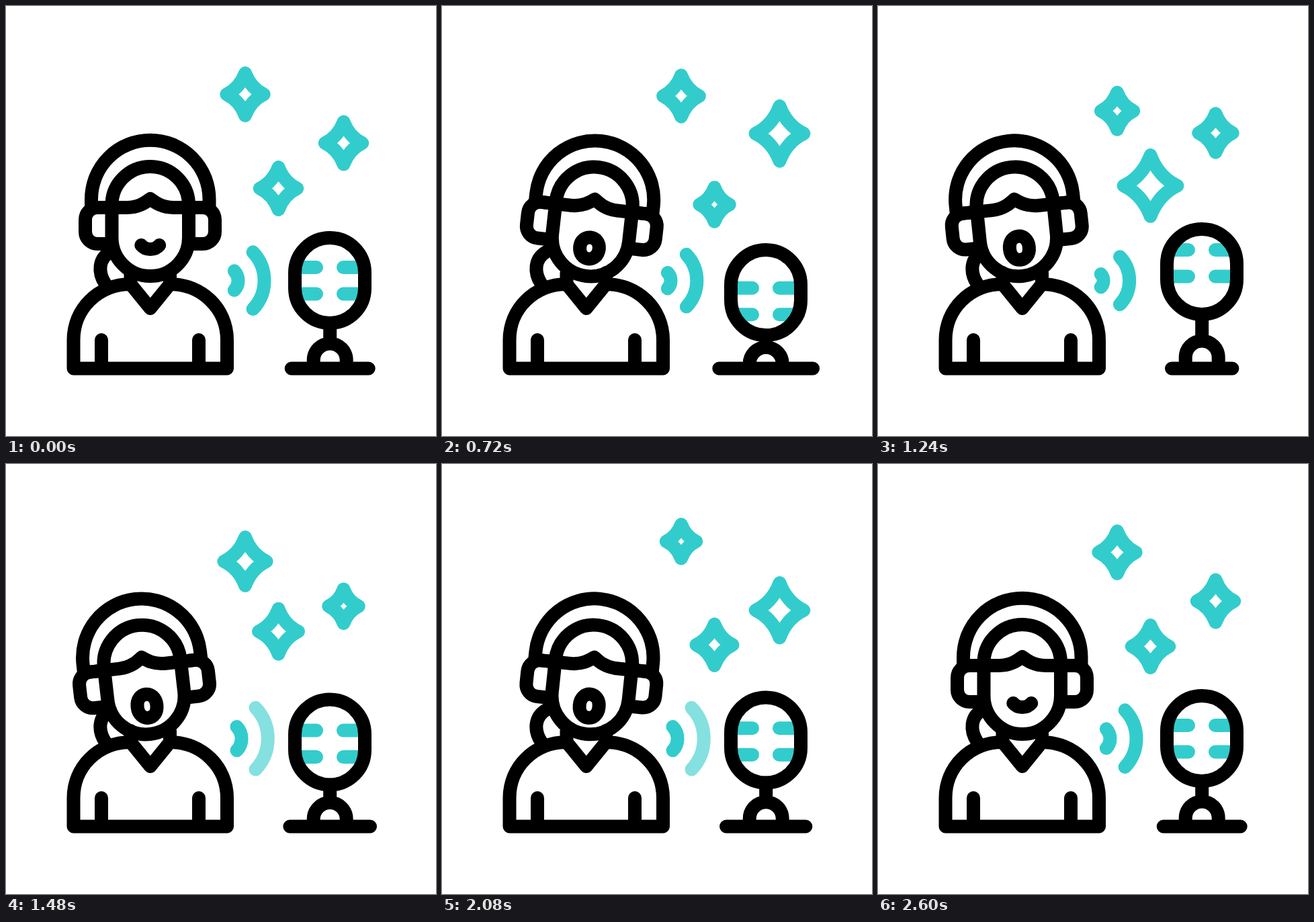
An HTML page for the animation above (3 s loop, 640x640 px).

```html
<!DOCTYPE html>
<html lang="en">
<head>
<meta charset="utf-8">
<title>Podcast recording</title>
<style>
  html, body { margin: 0; width: 100%; height: 100%; overflow: hidden; background: #fff; }
  svg { display: block; width: 100%; height: 100%; }
  path, rect { fill: none; stroke: #000; stroke-width: 20; stroke-linecap: round; stroke-linejoin: round; }
  .teal path { stroke: #33cccc; }
</style>
</head>
<body>
<svg viewBox="0 0 640 640">
  <g class="teal">
    <path id="star1"/><path id="star2"/><path id="star3"/>
    <path id="near"/><path id="far"/>
    <path id="bars" d="M434 389H462M502 389H530M434 428.5H462M502 428.5H530"/>
  </g>

  <path d="M155 366C138 376 136 396 148 414"/>
  <g id="head">
    <path d="M127 300V287.5A87.75 87.75 0 0 1 302.5 287.5V300"/>
    <rect x="157.5" y="239" width="114.5" height="163" rx="57.25"/>
    <path d="M127 300H180C198 300 208 292 214.75 287C221.5 292 231.5 300 249.5 300H302.5"/>
    <path d="M157 300H136A18 18 0 0 0 118 318V336A18 18 0 0 0 136 354H157"/>
    <path d="M272 300H293A18 18 0 0 1 311 318V336A18 18 0 0 1 293 354H272"/>
    <path id="mouth"/>
  </g>
  <path d="M100.5 539.5V497C100.5 451 137 414 185.5 414L214.75 450L244 414C292 414 329 451 329 497V539.5ZM142 497V539M287 497V539M185.5 414V397M244 414V397"/>

  <rect id="capsule" x="430" y="345" width="104" height="127" rx="52"/>
  <path id="stand"/>
</svg>
<script>
const LOOP = 3000;
const el = id => document.getElementById(id);
const ease = x => (1 - Math.cos(Math.PI * x)) / 2;
const clamp = x => Math.min(1, Math.max(0, x));

// Eased interpolation through [time, value] keys.
function tween(t, keys) {
  let value = keys[0][1];
  for (let i = 1; i < keys.length; i++) {
    const [t0, v0] = keys[i - 1], [t1, v1] = keys[i];
    if (t > t0) value = v0 + (v1 - v0) * ease(clamp((t - t0) / (t1 - t0)));
  }
  return value;
}

// Keys at a fixed spacing of 500 ms.
const swing = (t, start, values) => tween(t, values.map((v, i) => [start + 500 * i, v]));

const stars = [
  { id: "star1", x: 356, y: 131.5, start: 600, drift: [25, -17], scale: [1, .8, 1.19, .8, 1] },
  { id: "star2", x: 502.5, y: 204, start: 400, drift: [-25.5, 25], scale: [1, 1.41, .76, 1.41, 1] },
  { id: "star3", x: 405.5, y: 271.5, start: 200, drift: [25, -25], scale: [1, .8, 1.45, .8, 1] }
];

function drawStar(t, { id, x, y, start, drift, scale }) {
  const dy = tween(t, [[start, 0], [start + 600, drift[0]], [start + 1400, drift[1]], [start + 2000, 0]]);
  const k = swing(t, start, scale);
  const w = 27.7 * k, h = 31.5 * k, cx = 8.4 * k, cy = 9.2 * k;
  el(id).setAttribute("d",
    `M0 ${-h}Q${cx} ${-cy} ${w} 0Q${cx} ${cy} 0 ${h}Q${-cx} ${cy} ${-w} 0Q${-cx} ${-cy} 0 ${-h}Z`);
  el(id).setAttribute("transform", `translate(${x} ${y + dy})`);
}

function drawArc(id, bulge, half, opacity) {
  const x = bulge - .4 * half, r = 1.45 * half;
  el(id).setAttribute("d", `M${x} ${408.7 - half}A${r} ${r} 0 0 1 ${x} ${408.7 + half}`);
  el(id).setAttribute("opacity", opacity);
}

function drawSound(t) {
  const active = Math.min(2600, Math.max(200, t));
  const p = (active + 200) % 600 / 600;
  drawArc("near", 320.5 + 37.5 * p, 5 + 10 * p + 9 * p ** 3, clamp(3 * p));
  drawArc("far", 358.5 + 39 * p, 25 + 26 * p, clamp(3 - 3 * p));
}

function drawHead(t) {
  const angle = tween(t, [[200, 0], [680, 6.5], [1370, -7.1], [2200, 6.7], [2600, 0]]);
  el("head").setAttribute("transform", `rotate(${angle} 214.75 402)`);

  const open = tween(t, [[400, 0], [800, 1], [2200, 1], [2600, 0]]);
  const mix = (a, b) => a + (b - a) * open;
  const w = mix(13.5, 14.5), c = mix(7, 14.5), y = mix(356, 360);
  const top = y + mix(8, -23.5), bottom = y + mix(8, 23.5);
  const left = 214.75 - w, right = 214.75 + w;
  el("mouth").setAttribute("d",
    `M${left} ${y}C${214.75 - c} ${top} ${214.75 + c} ${top} ${right} ${y}` +
    `C${214.75 + c} ${bottom} ${214.75 - c} ${bottom} ${left} ${y}Z`);
}

function drawMic(t) {
  const bounce = (up, down) => swing(t, 200, [0, up, down, up, 0]);
  const dy = bounce(18.2, -13.6), arch = bounce(5.5, -4.2), half = 57.5 + bounce(12.5, -12.7);
  el("capsule").setAttribute("y", 345 + dy);
  el("bars").setAttribute("transform", `translate(0 ${bounce(31, -27)})`);
  el("stand").setAttribute("d",
    `M482.2 ${472 + dy}V${502.5 + arch}` +
    `M457.7 539.5V${527 + arch}A24.5 24.5 0 0 1 506.7 ${527 + arch}V539.5` +
    `M${482.2 - half} 539.5H${482.2 + half}`);
}

function frame() {
  const t = performance.now() % LOOP;
  stars.forEach(star => drawStar(t, star));
  drawSound(t);
  drawHead(t);
  drawMic(t);
  requestAnimationFrame(frame);
}
frame();
</script>
</body>
</html>
```
